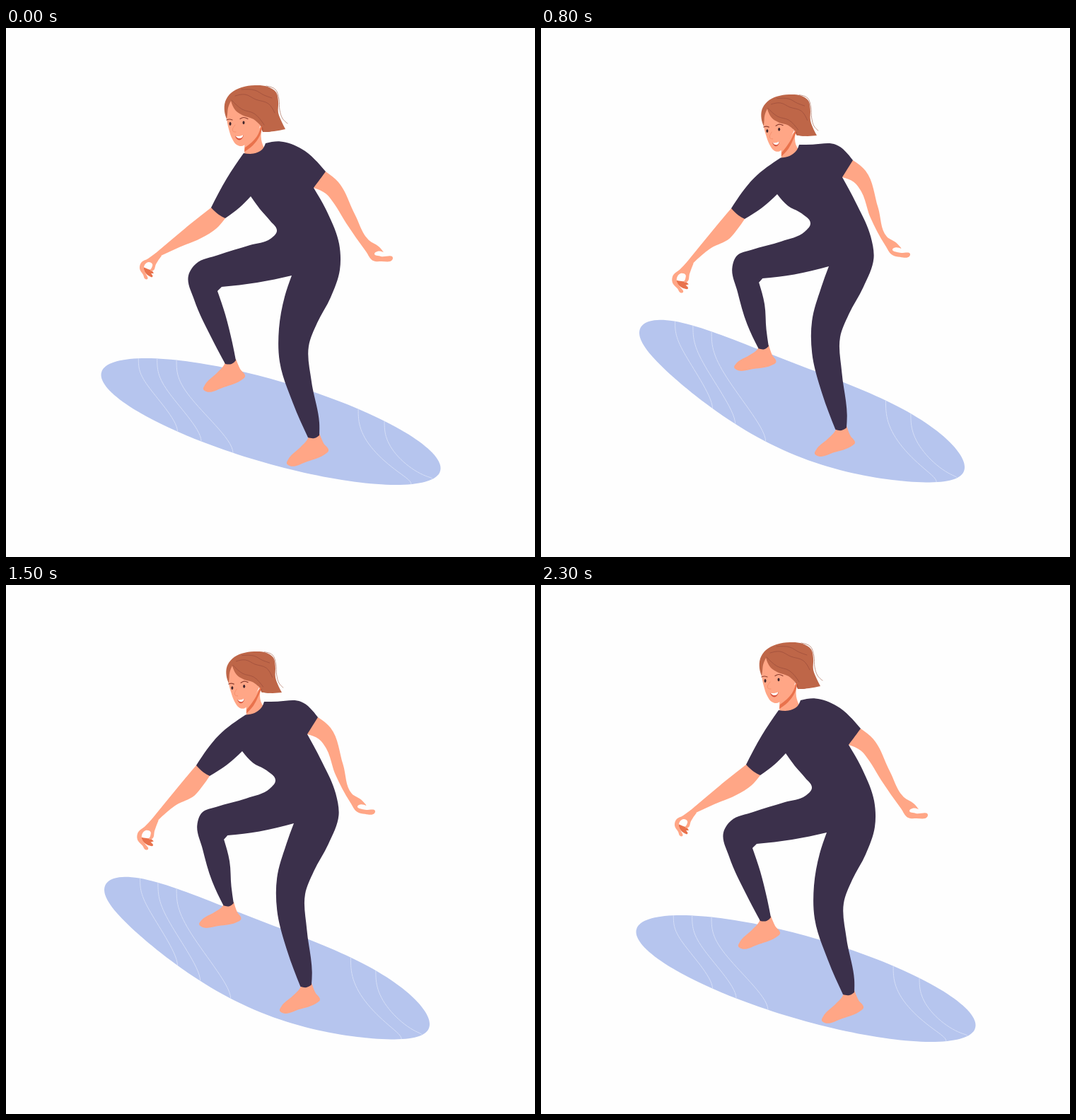
Recreate the animation shown at these times as an HTML page. Size 748 by 748 pixels, loop 2400 ms.

```html
<!DOCTYPE html>
<html lang="en">
<head>
<meta charset="utf-8">
<title>Surfer</title>
<style>
html, body { margin: 0; width: 100%; height: 100%; overflow: hidden; background: #fefefe; }
svg { display: block; width: 100vw; height: 100vh; }
</style>
</head>
<body>
<svg id="stage" viewBox="0 0 748 748"></svg>
<script>
const SKIN = '#ffa686', SHADE = '#e9724c', SUIT = '#3b304b', HAIR = '#be6648',
  STRAND = '#9b4d3b', BROW = '#8d3f30', BOARD = '#b6c5ee', STRIPE = '#d5def7', DARK = '#40262c';

// Four key poses on a ride from upright (level 0) to crouched (level 5).
const LEVELS = [0, 1, 3, 5];
const STEP = 100;

// "x,y" pairs; a trailing "!" marks a corner.
const parse = text => text.trim().split(/\s+/).map(item => {
  const [x, y] = item.split(',').map(parseFloat);
  return { x, y, corner: item.endsWith('!') };
});

// Joints, one per row, in each key pose. The figure is drawn once, in the first.
const torso = [
  '350,81 358,82 349,94 326,129',      // crown
  '395,143 400,143 390,152 367,186',   // hair tip
  '331,166 340,165 334,174 310,207',   // chin
  '367,163 374,159 365,165 343,194',   // collar
  '418,171 430,160 417,165 392,193',   // back
  '346,238 346,232 334,235 316,262',   // armpit
  '383,287 392,277 381,276 363,305',   // waist
  '473,330 481,320 471,315 454,346',   // hip
  '404,350 415,339 407,337 391,367'    // crotch
];
const arms = [
  '290,254 281,250 269,255 251,279',   // front sleeve
  '310,269 300,265 288,270 271,293',
  '215,320 220,328 210,332 191,357',   // front wrist and fingers
  '199,356 211,369 200,375 178,391',
  '452,203 459,185 441,187 413,215',   // rear sleeve
  '435,226 443,209 426,211 399,239',
  '470,218 477,201 459,202 432,231',   // rear elbow
  '513,300 507,291 489,295 460,321',   // rear wrist and fingers
  '547,326 541,317 522,321 494,347'
];
const legs = [
  '258,348 277,339 270,337 258,367',   // front knee, both sides
  '299,370 315,360 308,358 295,391',
  '317,475 320,458 314,454 307,490',   // front ankle and toe
  '279,512 278,487 273,481 266,519',
  '428,450 430,440 423,437 414,469',   // rear knee, both sides
  '384,448 388,440 381,437 372,471',
  '435,580 431,570 424,569 418,601',   // rear ankle and toe
  '397,617 393,605 387,603 381,635'
];
const joints = [...torso, ...arms, ...legs].map(parse);

// Board in each key pose: an ellipse sheared by `tilt` and bent by `sag`.
const boards = [
  { cx: 374.5, cy: 556.5, rx: 240, ry: 89.5, tilt: 66, sag: 0 },
  { cx: 374.5, cy: 528, rx: 234.5, ry: 108, tilt: 88, sag: 17 },
  { cx: 369, cy: 526, rx: 230, ry: 115, tilt: 95, sag: 17 },
  { cx: 365, cy: 561, rx: 231, ry: 105, tilt: 86, sag: 16 }
];

const weightsAt = level => LEVELS.map((a, i) =>
  LEVELS.reduce((w, b, j) => i === j ? w : w * (level - b) / (a - b), 1));
const mix = (values, w) => values.reduce((sum, v, k) => sum + v * w[k], 0);

const stage = document.getElementById('stage');
const figure = [], boardParts = [];

function make(tag, attrs) {
  const el = document.createElementNS('http://www.w3.org/2000/svg', tag);
  for (const key in attrs) el.setAttribute(key, attrs[key]);
  return stage.appendChild(el);
}

function tangent(a, b, c) {
  const l0 = Math.hypot(b.x - a.x, b.y - a.y), l1 = Math.hypot(c.x - b.x, c.y - b.y);
  const k0 = l0 ** -1.5, k1 = l1 ** -1.5;
  const x = (b.x - a.x) * k0 + (c.x - b.x) * k1, y = (b.y - a.y) * k0 + (c.y - b.y) * k1;
  const l = Math.hypot(x, y) || 1;
  return { x: x / l, y: y / l };
}

// Smooth curve through the points, sharp at corners.
function curve(pts, closed) {
  const n = pts.length, at = i => pts[(i + n) % n];
  const sharp = i => at(i).corner || (!closed && (i === 0 || i === n - 1));
  const mid = (p, q) => ({ x: (p.x + q.x) / 2, y: (p.y + q.y) / 2 });
  const show = (...list) => list.map(p => `${p.x.toFixed(2)} ${p.y.toFixed(2)}`).join(' ');
  let d = 'M' + show(pts[0]);
  for (let i = 0; i < (closed ? n : n - 1); i++) {
    const a = at(i), b = at(i + 1), len = Math.hypot(b.x - a.x, b.y - a.y) / 3;
    const handle = (j, sign) => {
      const t = tangent(at(j - 1), at(j), at(j + 1));
      return { x: at(j).x + sign * t.x * len, y: at(j).y + sign * t.y * len };
    };
    const end = sharp(i + 1) ? null : handle(i + 1, -1);
    const c1 = sharp(i) ? mid(a, end || b) : handle(i, 1);
    d += 'C' + show(c1, end || mid(b, c1), b);
  }
  return closed ? d + 'Z' : d;
}

// Moves a drawn point with the joints near it: a locally weighted turn, scale and shift.
function warp(v, moved) {
  let total = 0, px = 0, py = 0, qx = 0, qy = 0;
  const near = joints.map(([p], i) => {
    const w = 1 / ((p.x - v.x) ** 2 + (p.y - v.y) ** 2 + 0.01) ** 2, q = moved[i];
    total += w;
    px += w * p.x; py += w * p.y;
    qx += w * q.x; qy += w * q.y;
    return { p, q, w };
  });
  px /= total; py /= total; qx /= total; qy /= total;
  let re = 0, im = 0, size = 0;
  for (const { p, q, w } of near) {
    const ax = p.x - px, ay = p.y - py, bx = q.x - qx, by = q.y - qy;
    re += w * (ax * bx + ay * by);
    im += w * (ax * by - ay * bx);
    size += w * (ax * ax + ay * ay);
  }
  re /= size; im /= size;
  const x = v.x - px, y = v.y - py;
  return { x: qx + re * x - im * y, y: qy + im * x + re * y, corner: v.corner };
}

function draw(text, attrs, closed, dx = 0, dy = 0) {
  const pts = parse(text).map(p => ({ ...p, x: p.x + dx, y: p.y + dy }));
  const el = make('path', attrs);
  figure.push(moved => el.setAttribute('d', curve(pts.map(p => warp(p, moved)), closed)));
}
const shape = (fill, text, dx, dy) => draw(text, { fill }, true, dx, dy);
const line = (stroke, width, text) =>
  draw(text, { fill: 'none', stroke, 'stroke-width': width, 'stroke-linecap': 'round' }, false);

function eye(x, y) {
  const el = make('ellipse', { rx: 1.5, ry: 2.4, fill: DARK });
  figure.push(moved => {
    const p = warp({ x, y }, moved);
    el.setAttribute('cx', p.x);
    el.setAttribute('cy', p.y);
  });
}

// Point on the board: s from nose to tail, t from far edge to near edge, both -1 to 1.
function boardPoint(b, s, t) {
  const half = Math.sqrt((b.ry ** 2 - b.tilt ** 2) * (1 - s * s));
  const bend = b.sag * (1 - s * s) ** 2 * (1 - 0.4 * s);
  return `${(b.cx + b.rx * s).toFixed(2)} ${(b.cy + b.tilt * s + half * t + bend).toFixed(2)}`;
}

function boardPath(attrs, count, place) {
  const el = make('path', attrs);
  boardParts.push(b => el.setAttribute('d', 'M' + Array.from({ length: count + 1 },
    (_, i) => boardPoint(b, ...place(i / count))).join('L')));
}

boardPath({ fill: BOARD }, 160, u => {
  const angle = u * 2 * Math.PI;
  return [Math.cos(angle), Math.sign(Math.sin(angle))];
});
for (const [from, to] of [[-0.78, -0.55], [-0.67, -0.41], [-0.556, -0.223], [0.515, 0.827], [0.669, 0.952]])
  boardPath({ fill: 'none', stroke: STRIPE }, 30, u => {
    const e = u ** 1.5;
    return [from + (to - from) * e * e * (3 - 2 * e), 2 * u - 1];
  });

// Feet share one outline
const FOOT = '311,470! 308,477 298,488 281,505 279,511 283,514 308,508 334,497 338,493 331,482 325,468!';
shape(SKIN, FOOT);
shape(SKIN, FOOT, 118, 105);

// Rear arm
shape(SKIN, `452,203! 470,218 493,263 513,300 527,309 534,317! 525,316 521,319 530,323 547,325
  546,328 531,330 519,329 509,316 481,276 463,247 452,234 435,226! 440,208!`);

// Front arm and hand
shape(SKIN, '290,254! 262,276 212,318! 207,327! 219,322! 245,310 276,297 298,283 310,269! 306,255!');
shape(SHADE, '194,338! 201,341 206,343 209,347! 205,347! 207,352 203,351 197,346');
shape(SKIN, `212,318! 201,326 191,332 189,340 194,349 197,355 200,355 198,348 195,341
  196,335 202,331 207,334 206,339 204,343 208,343 212,334 220,322!`);

// Head
shape('#a9543a', '358,134! 386,138! 378,145 363,147!');
shape(SKIN, '338,160! 337,172 338,182! 356,186! 366,172! 361,158 362,138!');
shape(SHADE, '361,137! 355,153 338,169! 337,175! 349,166 359,152 362,142!');
shape(SKIN, '316,102! 312,125 315,143 320,157 326,165 333,167 343,161 353,151 360,137! 348,108!');
shape(HAIR, `312,129! 309,118 310,104 318,92 333,84 352,81 370,83 382,91 385,104 385,120
  390,133 395,143! 379,146 363,147! 363,141 359,137 350,129 336,124 326,118 321,111 318,103! 314,113 313,122`);
line(STRAND, 0.7, '324,96 338,94 353,101 371,107 380,120');
line(STRAND, 0.7, '333,87 352,88 365,95 376,99');
line(STRAND, 0.7, '319,102 334,115 351,121 365,137');
line('#b88272', 0.8, '368,82 381,87 386,101 387,116 391,128 398,135');
eye(317, 135.5);
eye(336, 133.8);
line(BROW, 1.2, '312,130 316,129 320,130');
line(BROW, 1.2, '331,128.5 336,126.5 342,128.5');
line('#f18c69', 0.8, '324,137 321,146 325,147');
shape('#d8553f', '324,152.5! 330,154 336,151! 334,156 330,158.5 326,156.5');
shape('#fff', '324.5,152.7! 330,153 335.5,151.2! 333.5,155 329,156');

// Wetsuit
shape(SUIT, `336,177! 350,177.5 362,172 367,163! 388,160.5 418,171 452,203! 435,226! 455,262
  471,305 472,342 459,381 440,417 428,450 432,500 443,558 443,576! 436,580 427,579! 406,531
  387,472 386,425 394,380 404,350! 355,360 305,366! 299,372! 310,405 320,445 325,470!
  319,475 310,475! 290,437 266,384 258,350 269,333 300,321 345,307 374,298 383,287
  373,272 359,256 346,238! 330,254 310,269! 301,264 290,254! 312,213`);

// Sink in five steps, rest, rise in five steps, rest.
function render(time) {
  const tick = Math.floor(time / STEP) % 12;
  const w = weightsAt(tick <= 5 ? tick : Math.min(5, 11 - tick));
  const moved = joints.map(poses => ({
    x: mix(poses.map(p => p.x), w),
    y: mix(poses.map(p => p.y), w)
  }));
  const board = {};
  for (const key in boards[0]) board[key] = mix(boards.map(b => b[key]), w);
  figure.forEach(update => update(moved));
  boardParts.forEach(update => update(board));
}

const start = performance.now();
function frame() {
  render(performance.now() - start);
  requestAnimationFrame(frame);
}
frame();
</script>
</body>
</html>
```
